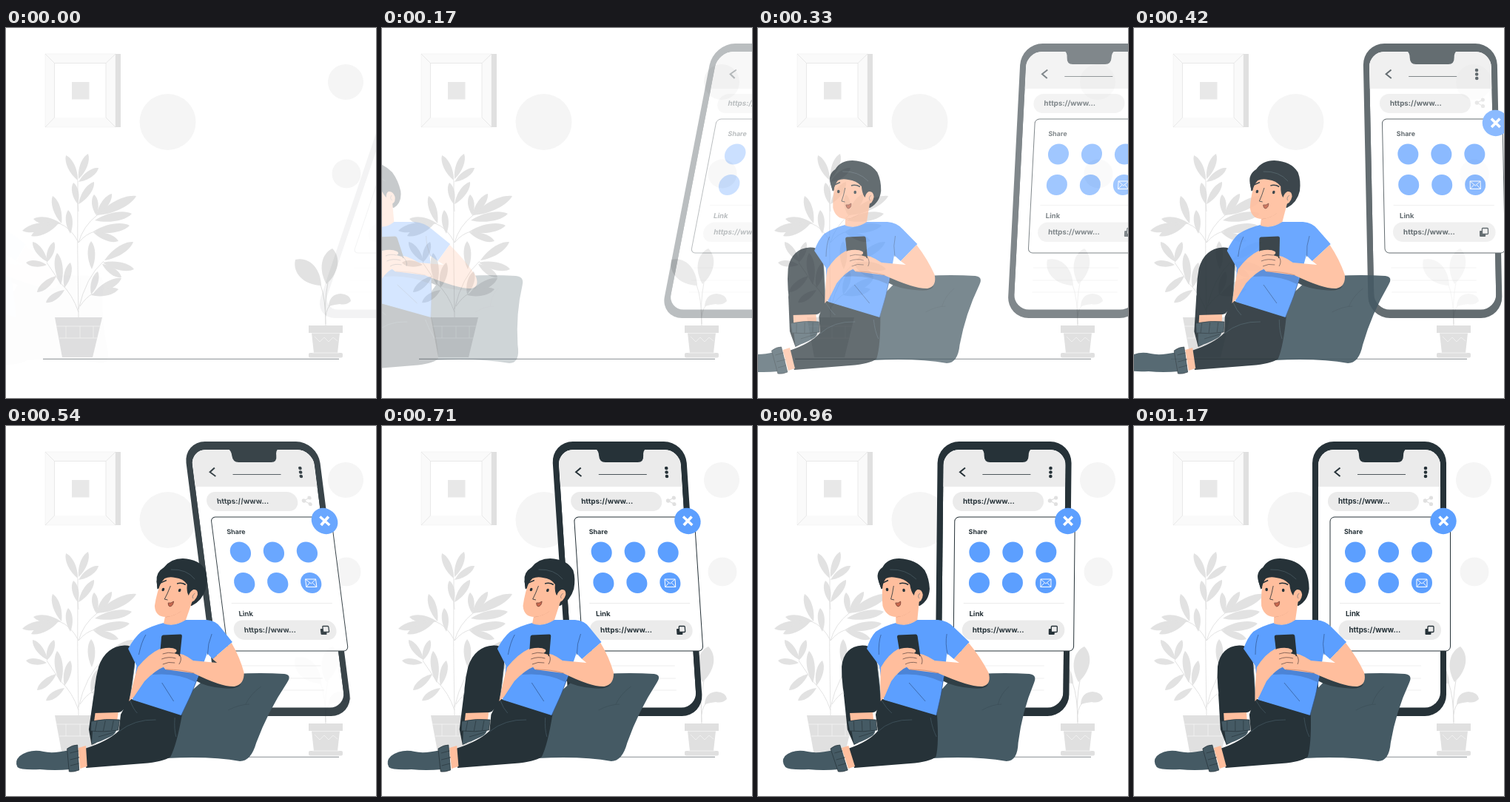
Write an HTML page with a canvas that moves like this. It is 500 px wide and 500 px high and loops after 1210 ms.

```html
<!DOCTYPE html>
<html lang="en">
<head>
<meta charset="utf-8">
<title>Sharing a link</title>
<style>
  html, body { margin: 0; width: 100%; height: 100%; overflow: hidden; background: #fff; }
  canvas { display: block; width: 500px; height: 500px; }
</style>
</head>
<body>
<canvas id="stage" width="500" height="500"></canvas>
<script>
const LOOP = 1210;
const DARK = '#263238', SLATE = '#455a64', BLUE = '#5c9fff', SKIN = '#ffbe9d';
const GREY = '#e0e0e0', LEAF = '#e2e2e2', PALE = '#ebebeb', MIST = '#f5f5f5';

const stage = document.getElementById('stage').getContext('2d');
const newLayer = () => {
  const canvas = document.createElement('canvas');
  canvas.width = canvas.height = 500;
  return canvas.getContext('2d');
};
const layer = newLayer(), backdrop = newLayer();
let ctx = stage;

// Drawing helpers
function shape(d, fill, stroke, width = 1) {
  const p = new Path2D(d);
  if (fill) { ctx.fillStyle = fill; ctx.fill(p); }
  if (stroke) { ctx.strokeStyle = stroke; ctx.lineWidth = width; ctx.stroke(p); }
}
const line = (d, color, width) => shape(d, null, color, width);
function box(x, y, w, h, r, fill, stroke, width = 1) {
  ctx.beginPath();
  ctx.roundRect(x, y, w, h, r);
  if (fill) { ctx.fillStyle = fill; ctx.fill(); }
  if (stroke) { ctx.strokeStyle = stroke; ctx.lineWidth = width; ctx.stroke(); }
}
function oval(x, y, rx, fill, ry = rx) {
  ctx.beginPath();
  ctx.ellipse(x, y, rx, ry, 0, 0, 7);
  ctx.fillStyle = fill;
  ctx.fill();
}
function label(text, x, y, size) {
  ctx.font = `700 ${size}px Inter, sans-serif`;
  ctx.fillStyle = DARK;
  ctx.fillText(text, x, y);
}
function leaf([x, y, tipX, tipY], width) {
  const dx = tipX - x, dy = tipY - y, length = Math.hypot(dx, dy);
  const half = (width || 4.5 + length * 0.14) * 0.67;
  const nx = -dy / length * half, ny = dx / length * half;
  ctx.beginPath();
  ctx.moveTo(x, y);
  ctx.bezierCurveTo(x + dx * .35 + nx, y + dy * .35 + ny, x + dx * .8 + nx, y + dy * .8 + ny, tipX, tipY);
  ctx.bezierCurveTo(x + dx * .8 - nx, y + dy * .8 - ny, x + dx * .35 - nx, y + dy * .35 - ny, x, y);
  ctx.fillStyle = LEAF;
  ctx.fill();
}

function drawPicture() {
  box(53, 35, 95, 99, 0, '#fafafa', '#f0f0f0', .6);
  box(148, 35, 7, 99, 0, GREY);
  box(65.5, 47.5, 69.5, 73.5, 0, '#fff');
  line('M65.5 121V47.5H135V121', GREY, .7);
  line('M53 35L65.5 47.5M148 35L135 47.5M53 134L65.5 121M148 134L135 121', GREY, .7);
  box(89, 73, 23.5, 23.5, 0, '#e8e8e8');
}

const crown = [
  [97, 206, 81, 172], [98, 204, 111, 170], [98, 208, 125, 189],
  [97, 238, 91, 209], [98, 238, 119, 208]
];
const leftBranches = [
  [75, 264, 63, 227], [87, 278, 84, 246], [74, 264, 37, 258], [70, 264, 22, 274], [71, 264, 34, 281],
  [56, 316, 36, 289], [55, 317, 65, 289], [55, 320, 27, 317],
  [74, 347, 69, 304], [79, 351, 87, 317], [68, 335, 42, 357], [79, 354, 54, 371]
];
const rightBranches = [
  [122, 253, 119, 225], [122, 254, 143, 224], [123, 253, 176, 227], [120, 260, 170, 251],
  [118, 275, 167, 267], [118, 276, 152, 288], [116, 326, 115, 288], [133, 314, 172, 289],
  [131, 317, 173, 326], [130, 319, 156, 337], [115, 360, 124, 329], [117, 360, 156, 338], [115, 361, 152, 353]
];

function drawPlants() {
  [...crown, ...leftBranches, ...rightBranches].forEach(l => leaf(l));
  line('M98 391Q96 300 97 206M98 290Q88 270 72 264M98 248L97 236M98 290Q104 268 123 253' +
       'M98 290Q108 278 120 275M98 384Q90 360 74 345L55 317M98 380Q108 336 132 315M100 376Q108 364 117 359', GREY, .9);
  shape('M66 391H130L117 445H76Z', GREY);
  line('M68 403H127M72 419H123M81 403V419M100 403V419M118 403V419', '#f3f3f3', .8);

  leaf([426, 348, 391, 313], 24);
  leaf([433, 346, 441, 298], 21);
  shape('M436 376Q437 360 452 359Q465 360 466 369Q460 375 451 373Q443 374 436 376Z', LEAF);
  line('M432 402Q432 365 425 347M432 400Q430 370 435 344M432 390Q433 378 440 373', GREY, 1);
  box(409, 402, 46, 10, 0, GREY);
  shape('M413 412H451L448 439H416Z', GREY);
  box(409, 439, 46, 6.5, 2, GREY);
  line('M413 412.5H451M414 439H450M417 417L424 424L430 418L436 424L442 418L448 423', '#f3f3f3', .8);
}

function drawBackdrop() {
  ctx.fillStyle = '#fff';
  ctx.fillRect(0, 0, 500, 500);
  drawPicture();
  oval(218.5, 127, 38, MIST);
  oval(459, 73, 24, MIST);
  oval(460, 197, 19.5, MIST);
  drawPlants();
  line('M50 447.3H450', DARK, .55);
}

function drawPhone() {
  box(241, 21, 181, 371, 29, DARK);
  ctx.save();
  ctx.beginPath();
  ctx.roundRect(249, 32, 165, 348.5, 21);
  ctx.clip();
  box(249, 31, 165, 350, 0, '#fff');
  box(249, 31, 165, 51, 0, PALE);
  ctx.restore();
  shape('M300 31Q304 33 304 40Q304 49 312 49H356Q364 49 364 40Q364 33 368 31Z', DARK);
  line('M278.5 56.5L271.5 62.3L278.5 68', DARK, 2);
  line('M302 65.5H367', DARK, .8);
  [57, 62.5, 68].forEach(y => oval(394, y, 2.3, DARK));

  box(262, 89, 123, 26, 13, PALE);
  label('https://www...', 276, 105, 9.8);
  line('M401.5 97L393.5 101L401.5 105.5', GREY, 1.2);
  oval(393.5, 101, 2.8, GREY);
  oval(401.5, 97, 2.6, GREY);
  oval(401.5, 105.5, 2.6, GREY);
  line('M273 324H388M273 341H388M273 357H388', PALE, .8);

  box(265, 123, 162.5, 181, 6, '#fff', DARK, 1);
  label('Share', 284, 145.5, 8.9);
  for (const y of [170.5, 212]) for (const x of [299, 344, 389]) oval(x, y, 14, BLUE);
  box(382, 207, 14, 10.5, .5, null, '#fff', 1);
  line('M382 207L389 213L396 207M382 217.5L387 212M396 217.5L391 212', '#fff', .9);
  line('M278 239.5H414', PALE, 1);
  label('Link', 286, 256.5, 9.5);
  box(276.5, 262.5, 138.5, 26.5, 13, PALE);
  label('https://www...', 290.5, 279, 9.8);
  box(393.5, 274, 8, 8, 1, DARK);
  box(397, 270.5, 8, 8, 1, PALE, DARK, 1.3);

  oval(418, 128.5, 17.7, BLUE);
  line('M412.5 122.5L424 134M424 122.5L412.5 134', '#fff', 3.6);
}

function drawLegs() {
  // lying leg and hips
  shape('M163 368L239 390Q240 430 235 447Q226 454 200 456L124 462L117 436Q146 426 158 412L156 390Z', DARK);
  shape('M108 435L117.5 432L125 460L116 463Z', SKIN);
  shape('M97 438Q75 443 62 440Q43 436 31 446Q25 453 31 461Q36 465 62 464Q82 466 103 464Z', SLATE);
  shape('M93 436Q99 431 106 431L115 465Q108 468 102 467Z', SLATE, DARK, .7);
  line('M98 442L109 439M100 451L112 448M102 459L113 456', DARK, .6);
  // bent leg
  shape('M114 360L117 410L125 431L131 428L124 388Z', DARK);
  shape('M121 384H152L153 400H122Z', SKIN);
  shape('M122 408H154Q156 416 148 420Q138 426 125 430Z', SLATE);
  shape('M118 399Q137 395 156 397L157 411Q138 414 120 412Z', SLATE, DARK, .7);
  line('M126 399V412M137 398V412M148 398V411M132 420L152 414', DARK, .6);
  shape('M119 388Q111 352 113 325Q117 298 142 296.5Q159 296 160.5 315Q163 345 164 370Q160 386 153 387Z', DARK);
  line('M161 322Q163 345 164 370M165 371Q171 382 178 388M158 413Q176 396 205 397M230 394Q232 410 237 420', SLATE, .7);
}

function drawTorso() {
  shape('M161 278Q173 270 189 266Q204 272 216 262H246Q259 263 267 272L287 292L265 315L256 307' +
        'Q250 350 238 391L168 370L164 324L148 301Q153 286 161 278Z', BLUE);
  shape('M188 331L204 325L250 334L248 346Q222 333 188 336Z', '#4c84d6');
  line('M257 281Q254 294 257 309M203 347L224 372M168 282Q164 292 164 309M238 391Q247 362 251 335', '#31568f', .7);
  // forearm on the left
  shape('M163.5 372Q164 342 166 326Q177 308 191 301L207 312L204 324Q190 330 179 345L169 366Z', SKIN);
  // arm resting on the cushion
  shape('M286 293Q301 312 311 333Q315 349 302 352Q285 353 243 334L204 329L195 320L204 306' +
        'Q222 305 239 317L272 320L265 315Z', SKIN);
  // device and fingers
  shape('M191.5 282.5L215 281.5Q217 281.5 217.3 284L220 311L193 312L189.7 285Q189.7 282.7 191.5 282.5Z', DARK);
  shape('M179 313L193 301Q206 298 213 302Q216 305 211 307L218 309Q220 312 215 314L218 317Q219 320 213 321L195 325Z', SKIN);
  line('M196 308Q203 305 211 307M196 315Q205 311 215 314M199 322Q206 318 215 320M220 310Q224 316 221 322', '#5a4540', .7);
  line('M244 334Q226 329 205 329', '#b9795f', .6);
}

function drawHead() {
  shape('M168 210Q164 198 174 191Q181 179 197 179Q220 180 231 195Q236.5 206 236.5 220Q235 236 222 243L208 240L200 214L171 220Z', DARK);
  shape('M189 250V267Q204 272 218 262L222 234L205 238Z', SKIN);
  line('M190 258Q202 256 209 250', '#c5836a', .7);
  shape('M175 205Q171 225 172 243Q176 258 190 258Q206 257 214 245L218 238' +
        'Q226 238 227 228Q226 220 220 221Q216 223 215 229Q211 222 210 208Q196 200 184 200Z', SKIN);
  shape('M168 210Q167 197 177 192Q201 188 212 206L215 229Q211 224 210 214Q203 206 192 205Q184 203 178 206Q174 211 171.5 221Z', DARK);
  line('M184 194Q205 193 219 207M223 226Q219 230 222 233', '#52656e', .6);
  oval(179, 221, 1.8, DARK, 2.3);
  oval(201.5, 222, 1.8, DARK, 2.3);
  line('M173.5 212L181 208.5M196 213Q202 211 208 214.5', DARK, 1.5);
  line('M188 216Q186 227 183.5 234L188 235', DARK, .8);
  shape('M189.5 239Q193 240 196.5 237Q197 243.5 192.5 244Q190 243 189.5 239Z', '#c9694f', '#6d3a31', .7);
}

function drawPerson() {
  shape('M205 400L264 338Q318 332 366 335Q377 336 372 347Q354 386 347 428Q345 453 330 453Q290 446 230 449Z', SLATE);
  shape('M252 330L310 349Q306 357 285 354Q262 352 248 344Z', '#303f46');
  line('M338 352Q326 362 322 376M300 384Q314 376 327 376', '#3b4d56', .6);
  drawLegs();
  drawTorso();
  drawHead();
}

// Motion
function overshoot(x) {
  const curve = (s, a, b) => 3 * (1 - s) ** 2 * s * a + 3 * (1 - s) * s * s * b + s ** 3;
  let low = 0, high = 1;
  for (let i = 0; i < 24; i++) {
    const mid = (low + high) / 2;
    if (curve(mid, .36, .5) < x) low = mid; else high = mid;
  }
  return curve(low, -.01, 1.38);
}
const linear = x => x;
const slope = degrees => Math.tan(degrees * Math.PI / 180);
const mix = (a, b, k) => a + (b - a) * k;

// Slide in from one side while leaning, then rock upright.
function lightSpeed(progress, side, ease) {
  const p = Math.min(progress, 1);
  if (p < .6) {
    const k = ease(p / .6);
    return { x: side * 250 * (1 - k), lean: side * mix(slope(-20), slope(10), k), alpha: Math.min(1, Math.max(0, k)) };
  }
  const lean = p < .8
    ? mix(slope(10), slope(-2), ease((p - .6) / .2))
    : mix(slope(-2), 0, ease((p - .8) / .2));
  return { x: 0, lean: side * lean, alpha: 1 };
}

function drawActor(draw, pivotY, { x, lean, alpha }) {
  ctx = layer;
  ctx.setTransform(1, 0, 0, 1, 0, 0);
  ctx.clearRect(0, 0, 500, 500);
  ctx.setTransform(1, 0, lean, 1, x - lean * pivotY, 0);
  draw();
  stage.globalAlpha = alpha;
  stage.drawImage(layer.canvas, 0, 0);
  stage.globalAlpha = 1;
}

ctx = backdrop;
drawBackdrop();

function render(now) {
  const step = Math.floor((now % LOOP + 3.5) * 24 / 1000);
  const time = 30 + Math.min(step, 28) * 39.7;
  stage.drawImage(backdrop.canvas, 0, 0);
  drawActor(drawPhone, 206, lightSpeed(time / 1000, 1, linear));
  drawActor(drawPerson, 323, lightSpeed(time / 1200, -1, overshoot));
}

let start;
function tick(now) {
  start ??= now;
  render(now - start);
  requestAnimationFrame(tick);
}
render(0);
requestAnimationFrame(tick);
</script>
</body>
</html>
```
